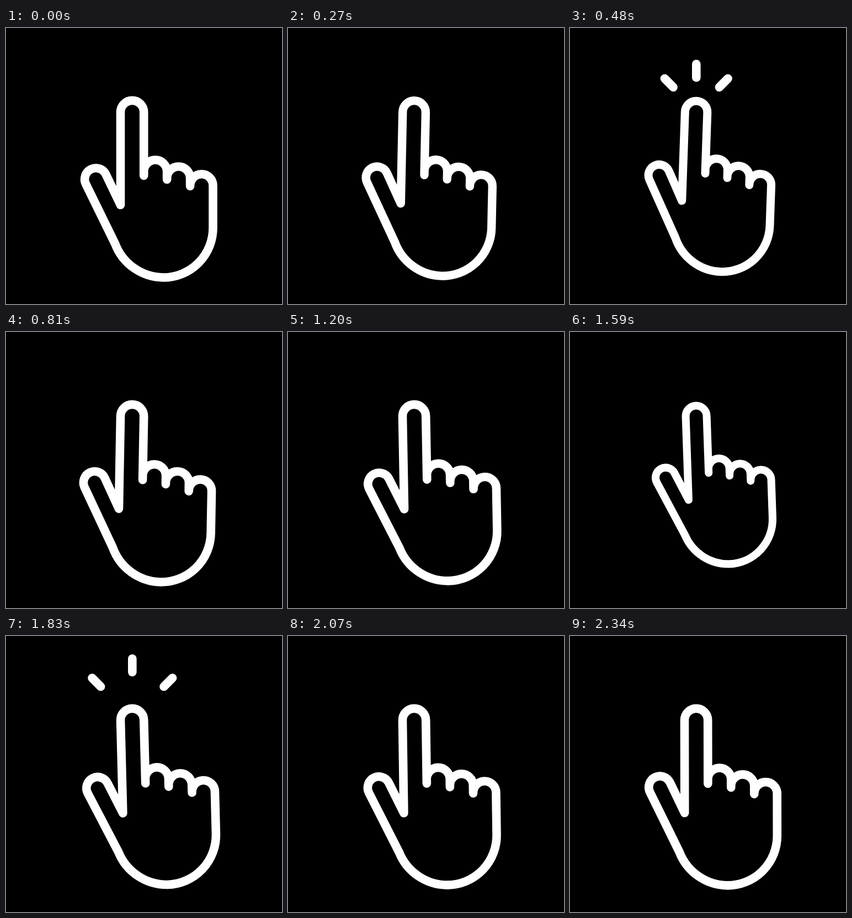
An HTML page for the animation above (2.37 s loop, 500x500 px).

```html
<!DOCTYPE html>
<html lang="en">
<head>
<meta charset="utf-8">
<title>Tap gesture</title>
<style>
  html, body { margin: 0; width: 100%; height: 100%; overflow: hidden; background: #000; }
  svg { display: block; width: 100%; height: 100%; }
  path { fill: none; stroke: #fff; stroke-width: 15.6; stroke-linecap: round; stroke-linejoin: round; }
</style>
</head>
<body>
<svg viewBox="0 0 500 500">
  <path id="hand" d="M249.7 267.5V152.5a21.1 21.1 0 0 0-42.2 0V320.5L181 265.3A20 20 0 0 0 144.6 282.7L197.7 391A94.5 94.5 0 0 0 285 452A90 90 0 0 0 375 362V285.5a20.7 20.7 0 0 0-41.4 0V286.5V272a21 21 0 0 0-42 0V274.5V260a21 21 0 0 0-42 0"/>
  <g id="burst">
    <path d="M228.8 41V65.5"/>
    <path d="M156 76L171.6 91.8"/>
    <path d="M301.6 76L286 91.8"/>
  </g>
</svg>
<script>
  const LOOP = 2370, STEP = 30, TAP_GAP = 1200;
  const PIVOT = [228.5, 152];
  const hand = document.getElementById('hand');
  const burst = document.getElementById('burst');
  const rays = [...burst.children];
  const directions = [[0, 1], [0.64, 0.64], [-0.64, 0.64]];

  const linear = u => u;
  const smooth = u => u * u * (3 - 2 * u);
  const sine = u => (1 - Math.cos(Math.PI * u)) / 2;

  // Each key: [time, value, easing towards this key]
  const TILT = [[0, 0], [450, 2, linear], [1560, -2, sine], [1640, -2, linear], [LOOP, 0, linear]];
  const PRESS = [[233, 1], [396, 0.9, smooth], [545, 1, smooth]];
  const TRAVEL = [[400, 52], [550, 0, linear]];
  const FADE = [[640, 1], [730, 0, linear]];

  function sample(keys, t) {
    if (t <= keys[0][0]) return keys[0][1];
    for (let i = 1; i < keys.length; i++) {
      const [t0, a] = keys[i - 1], [t1, b, ease] = keys[i];
      if (t < t1) return a + (b - a) * ease((t - t0) / (t1 - t0));
    }
    return keys[keys.length - 1][1];
  }

  function draw(t) {
    const tap = t < TAP_GAP ? t : t - TAP_GAP;
    const [x, y] = PIVOT;
    hand.setAttribute('transform',
      `translate(${x} ${y}) rotate(${sample(TILT, t)}) scale(${sample(PRESS, tap)}) translate(${-x} ${-y})`);

    const d = sample(TRAVEL, tap);
    rays.forEach((ray, i) => {
      const [dx, dy] = directions[i];
      ray.setAttribute('transform', `translate(${dx * d} ${dy * d})`);
    });
    burst.setAttribute('opacity', tap < 400 ? 0 : sample(FADE, tap));
  }

  const start = performance.now();
  function tick() {
    const t = (performance.now() - start) % LOOP;
    draw(Math.floor(t / STEP) * STEP);
    requestAnimationFrame(tick);
  }
  tick();
</script>
</body>
</html>
```
